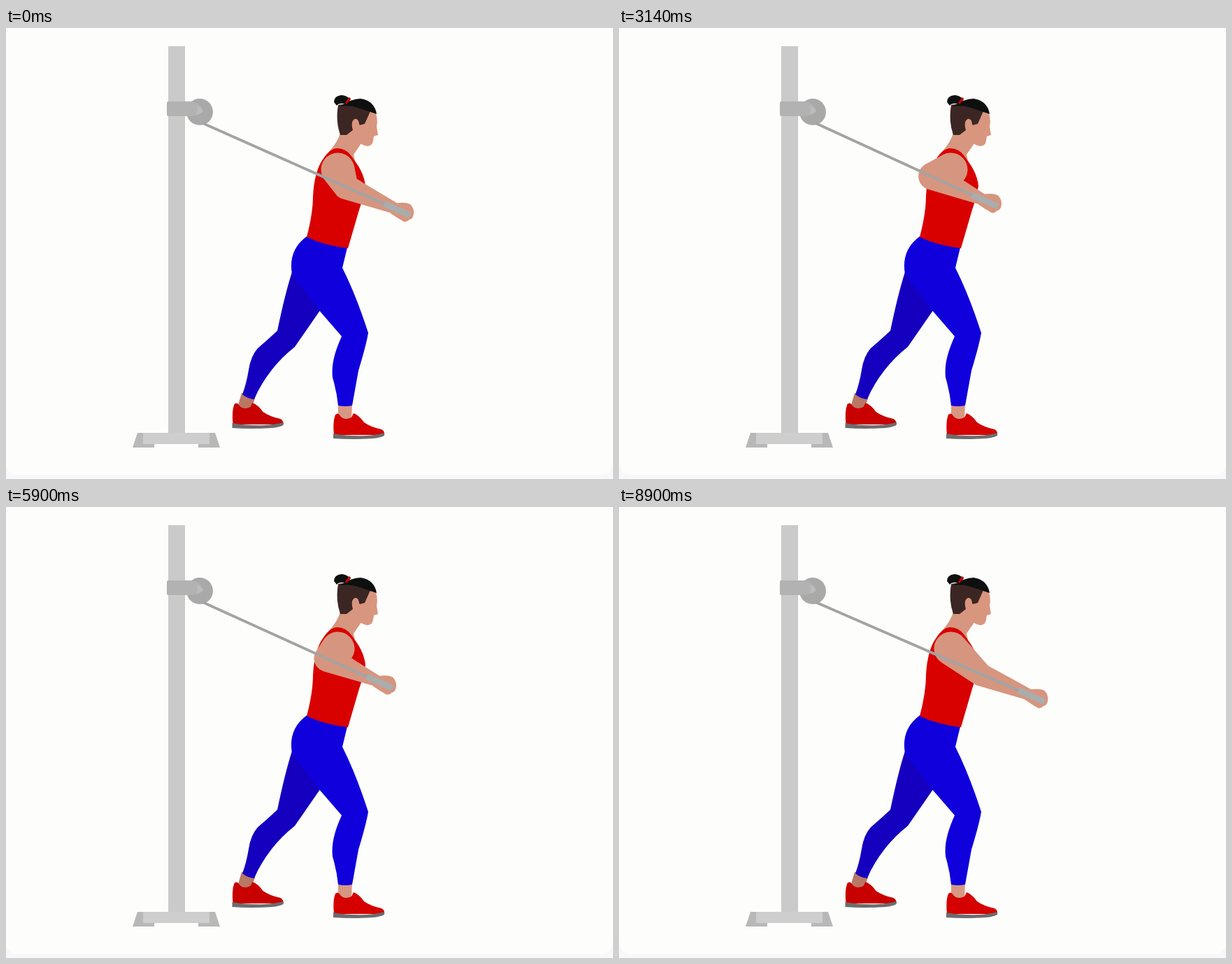
An HTML page for the animation above (8.93 s loop, 868 px wide and 645 px high).

```html
<!DOCTYPE html>
<html lang="en">
<head>
<meta charset="utf-8">
<title>Cable press</title>
<style>
  html, body { margin: 0; width: 100%; height: 100%; overflow: hidden; background: #f8f8fb; }
  svg { display: block; width: 100vw; height: 100vh; }
</style>
</head>
<body>
<svg viewBox="0 0 868 645">
  <defs>
    <g id="shoe">
      <path d="M471 553Q475 549 478 555Q484 562 494 557L497 551Q505 554 512 564Q522 571 537 574Q542 577 541 582L469 582Q467 563 471 553Z"/>
      <path fill="#6c6c6c" d="M468 580Q490 584 515 583Q530 582 541 579V583Q535 586 525 587Q495 589 468 587Z"/>
    </g>
  </defs>
  <path fill="#fdfdfb" d="M0 0H868V621Q868 639 850 639H18Q0 639 0 621Z"/>

  <g id="machine">
    <path fill="#cacaca" d="M232 26H256V580H232Z"/>
    <path fill="#b8b8b8" d="M188 579H299L306 600H275V594H212V600H181Z"/>
    <path fill="#cecece" d="M196 579H291V595H196Z"/>
    <circle cx="277" cy="120" r="19" fill="#a9a9a9"/>
    <path fill="#b2b2b2" d="M232 105H267Q279 108 282 119Q276 126 262 126H232Q230 126 230 124V107Q230 105 232 105Z"/>
    <path fill="#bcbcbc" d="M272 112Q280 113 282 119Q278 124 272 123Q276 117 272 112Z"/>
  </g>

  <g id="legs">
    <path fill="#ba7764" d="M337 522L356 530L350 546H330Z"/>
    <use href="#shoe" x="-144.500" y="-15" fill="#c80000"/>
    <path fill="#1500c0" d="M409 349Q399 380 388 433Q374 446 360 458Q350 469 347 489Q344 508 338 524Q345 530 355 531Q363 511 380 489Q394 471 413 456L449 404L440 360Z"/>
    <path fill="#d69883" d="M475 537H495L494 560H475Z"/>
    <use href="#shoe" fill="#d50000"/>
    <path fill="#1000dc" d="M430 298L488 314L481 343Q501 383 518 436Q515 454 504 490L495 540Q485 542 475 540Q473 520 467 500C465 482 470 463 480 441L448 404L409 352Q403 318 430 298Z"/>
  </g>

  <g id="torso">
    <path fill="#d6967f" d="M478 150Q475 162 462 177L475 190L500 195L497 181L508 165L500 145Z"/>
    <path fill="#d90000" d="M453 188Q463 172 474 172Q485 172 493 182L498 189Q512 207 514 226Q511 243 505 260L489 315Q455 311 430 299Q439 265 439 240Q441 205 453 188Z"/>
  </g>

  <g id="head">
    <path fill="#d9967f" d="M490 125L520 119L529 122Q532 132 530 141L532 153L526 155L525 161Q524 169 516 169Q505 166 498 159L484 152Z"/>
    <path fill="#3c2623" d="M475 110Q471 133 478 153H487L496 146Q492 132 500 130L506 139L513 137L521 119L495 107Z"/>
    <ellipse cx="500" cy="138" rx="5" ry="8" fill="#d9967f"/>
    <path fill="#0d100f" d="M478 112Q494 101 507 101Q527 104 530 123Q518 119 503 114Q492 110 478 112Z"/>
    <path fill="#0d100f" d="M493 102Q486 96 480 96Q469 97 469 106L473 111Q476 106 487 109Z"/>
    <path stroke="#c00" stroke-width="3" d="M492 100L486 108"/>
  </g>

  <path id="arm" fill="#d6957f"/>
  <path id="hand" fill="#d6957f" d="M-20-16Q-12-13-8-14Q2-15 8-12Q14-6 13 2Q12 9 7 10Q3 14-1 13L-11 7L-20 1Z"/>
  <line id="cable" x1="281" y1="136" stroke="#a2a4a4" stroke-width="4"/>
  <path id="grip" stroke="#aaadab" stroke-width="9" d="M-29-12.500L8 4"/>
</svg>
<script>
const LOOP = 8930, CYCLE = 3590, PEAK = 1015;
const SHOULDER = { x: 474.5, y: 202.5, r: 24 };
const $ = id => document.getElementById(id);

// Two circles joined by their outer tangents.
function limb(a, b) {
  const dx = b.x - a.x, dy = b.y - a.y;
  const heading = Math.atan2(dy, dx);
  const spread = Math.acos((a.r - b.r) / Math.hypot(dx, dy));
  const edge = (c, side) =>
    `${c.x + c.r * Math.cos(heading + side * spread)} ${c.y + c.r * Math.sin(heading + side * spread)}`;
  return `M${edge(a, 1)}A${a.r} ${a.r} 0 1 1 ${edge(a, -1)}` +
         `L${edge(b, -1)}A${b.r} ${b.r} 0 0 1 ${edge(b, 1)}Z`;
}

function draw(time) {
  const swing = Math.cos(2 * Math.PI * (time - PEAK) / CYCLE);
  const hand = { x: 581.5 + 57 * swing, y: 268 + 20 * swing };
  const elbow = { x: 498 + 60 * swing, y: 232 + 24 * swing, r: 17.2 - 2.9 * swing };
  const wrist = { x: hand.x - 17, y: hand.y - 7.5, r: 8.5 };

  $('arm').setAttribute('d', limb(SHOULDER, elbow) + limb(elbow, wrist));
  for (const id of ['hand', 'grip']) $(id).setAttribute('transform', `translate(${hand.x} ${hand.y})`);
  $('cable').setAttribute('x2', hand.x - 26);
  $('cable').setAttribute('y2', hand.y - 11);
}

const start = performance.now();
function tick() {
  draw((performance.now() - start) % LOOP);
  requestAnimationFrame(tick);
}
tick();
</script>
</body>
</html>
```
